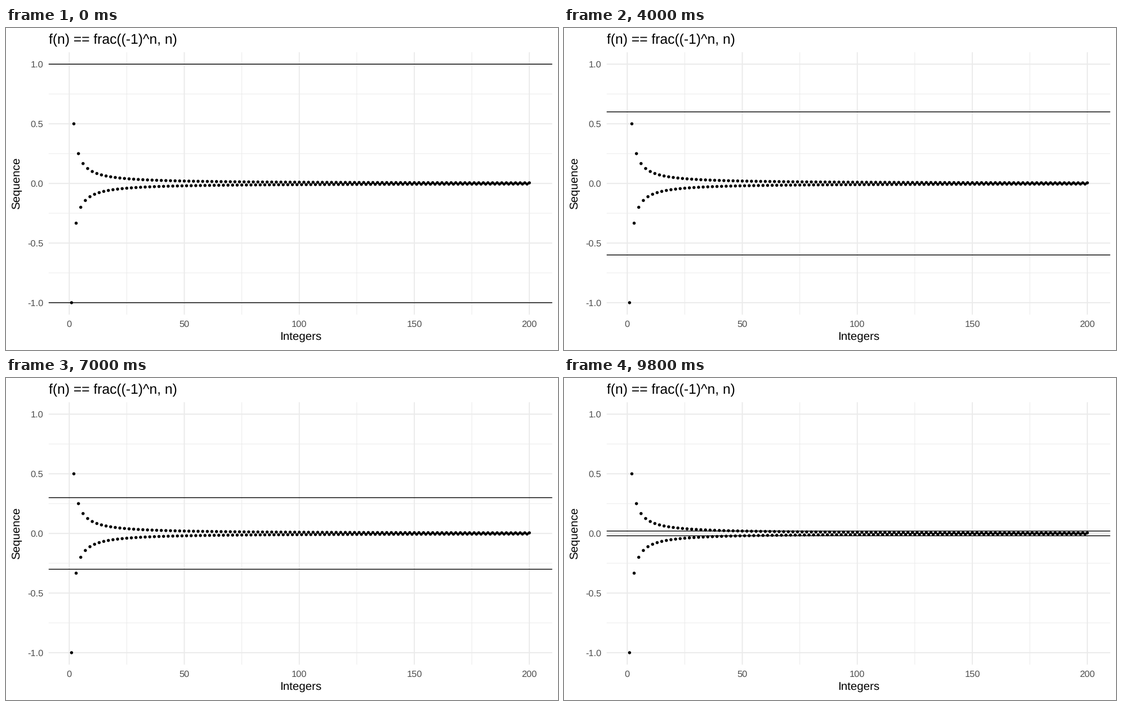
These frames come from a looping animation (980x572 px, 10 s). A matplotlib script:

```python
import numpy as np
import matplotlib.pyplot as plt
from matplotlib.animation import FuncAnimation
from matplotlib.collections import PatchCollection
from matplotlib.patches import Circle

W, H, DPI = 980, 572, 100
FRAMES, INTERVAL = 50, 200

LEFT, RIGHT = 75.75, 969.75
X0, X_UNIT = 112.3, 4.0842
Y0, Y_UNIT = 276.1, 211.85
TOP, BOTTOM = Y0 - 1.1 * Y_UNIT, Y0 + 1.1 * Y_UNIT

BASE = 20.5               # text size in pixels
SMALL, LARGE = 0.8 * BASE, 1.2 * BASE
GRID, TICK = "#EBEBEB", "#4D4D4D"
DIGIT, DOT, DASH = 0.556, 0.278, 0.333   # glyph advances in em

plt.rcParams["font.family"] = "Liberation Sans"
plt.rcParams["text.hinting"] = "none"

fig = plt.figure(figsize=(W / DPI, H / DPI), dpi=DPI, facecolor="white")
ax = fig.add_axes([0, 0, 1, 1])
ax.set_xlim(0, W)
ax.set_ylim(H, 0)
ax.axis("off")


def px(n):
    return X0 + X_UNIT * n


def py(v):
    return Y0 - Y_UNIT * v


def line(xs, ys, width, color, z):
    return ax.plot(xs, ys, color=color, lw=width * 72 / DPI, zorder=z,
                   solid_capstyle="butt", snap=False)[0]


def hline(v, width, color, z):
    y = py(v)
    return line([LEFT, RIGHT], [y, y], width, color, z)


def vline(n, width, color, z):
    x = px(n)
    return line([x, x], [TOP, BOTTOM], width, color, z)


def label(x, y, text, size, color="black", angle=0):
    ax.text(x, y, text, fontsize=size * 72 / DPI, color=color, rotation=angle,
            ha="left", va="baseline", rotation_mode="anchor", zorder=5)


# Grid
for v in (-0.75, -0.25, 0.25, 0.75):
    hline(v, 1, GRID, 1)
for n in (25, 75, 125, 175):
    vline(n, 1, GRID, 1)
for v in (-1, -0.5, 0, 0.5, 1):
    hline(v, 2, GRID, 2)
    width = 2 * DIGIT + DOT + (DASH if v < 0 else 0)
    label(66.5 - width * SMALL, py(v) + 5.9, f"{v:.1f}", SMALL, TICK)
for n in range(0, 201, 50):
    vline(n, 2, GRID, 2)
    width = DIGIT * len(str(n))
    label(px(n) - width * SMALL / 2, 530.5, str(n), SMALL, TICK)

# Titles
label(LEFT, 28, "f(n) == frac((-1)^n, n)", LARGE)
label(485.7, 553.6, "Integers", BASE)
label(25, 322.3, "Sequence", BASE, angle=90)

# Sequence points
dots = [Circle((px(n), py((-1) ** n / n)), 2.75) for n in range(1, 201)]
ax.add_collection(PatchCollection(dots, facecolor="black", linewidth=0, zorder=4))

# Shrinking epsilon band
upper = hline(1, 1.4, "black", 3)
lower = hline(-1, 1.4, "black", 3)


def update(i):
    eps = 1 - i / FRAMES
    upper.set_ydata(np.full(2, py(eps)))
    lower.set_ydata(np.full(2, py(-eps)))
    return upper, lower


anim = FuncAnimation(fig, update, frames=FRAMES, interval=INTERVAL,
                     init_func=lambda: update(0), repeat=True, repeat_delay=0)
plt.show()
```
